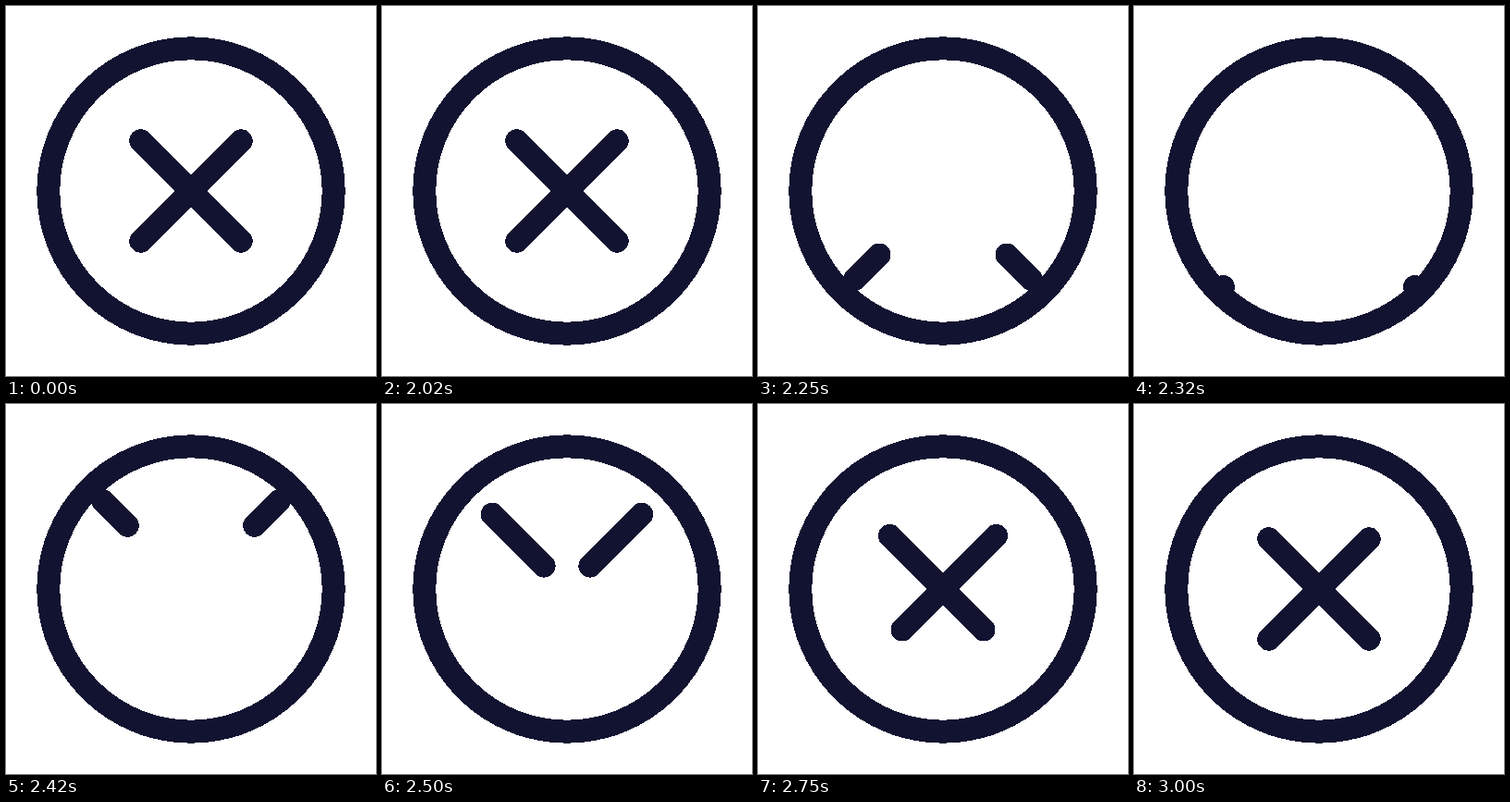
Recreate the animation shown at these times as an HTML page. Size 400 by 400 pixels, loop 3020 ms.

```html
<!DOCTYPE html>
<html lang="en">
<head>
<meta charset="utf-8">
<title>Close icon</title>
<style>
  html, body { margin: 0; width: 100%; height: 100%; overflow: hidden; background: #fff; }
  svg { display: block; width: 100vw; height: 100vh; }
</style>
</head>
<body>
<svg viewBox="-200 -200 400 400" fill="none" stroke="#121331" stroke-width="25"
     stroke-linecap="round" shape-rendering="crispEdges">
  <circle r="154.2"/>
  <path id="cross"/>
</svg>
<script>
const LOOP = 3020;
const LEAVE = 2020, TURN = 2362, SETTLE = 3005;
const ARM = 54.2;   // half extent of the resting cross
const RIM = 109;    // diagonal point on the ring's centre line
const cross = document.getElementById("cross");

const lerp = (a, b, p) => a + (b - a) * p;
const span = (t, from, to) => Math.min(1, Math.max(0, (t - from) / (to - from)));
const easeOut = x => 1 - (1 - x) ** 3;

// Cubic bezier easing with control points (.45, 0) and (.6, 1)
function easeInOut(x) {
  let lo = 0, hi = 1;
  for (let i = 0; i < 20; i++) {
    const s = (lo + hi) / 2, r = 1 - s;
    if (3 * s * r * r * .45 + 3 * s * s * r * .6 + s ** 3 < x) lo = s;
    else hi = s;
  }
  return lo * lo * (3 - 2 * lo);
}

function draw(t) {
  let top, bottom;
  if (t < TURN) {
    // Slide down into the ring
    const p = easeInOut(span(t, LEAVE, TURN));
    top = lerp(-ARM, RIM, p);
    bottom = lerp(ARM, RIM, p);
  } else {
    // Come back in from the upper rim
    const p = easeOut(span(t, TURN, SETTLE));
    top = lerp(-RIM, -ARM, p);
    bottom = lerp(-RIM, ARM, p);
  }
  cross.setAttribute("d",
    `M${top} ${top}L${bottom} ${bottom}M${-top} ${top}L${-bottom} ${bottom}`);
}

let start;
function tick(now) {
  start ??= now;
  draw((now - start) % LOOP);
  requestAnimationFrame(tick);
}
draw(0);
requestAnimationFrame(tick);
</script>
</body>
</html>
```
